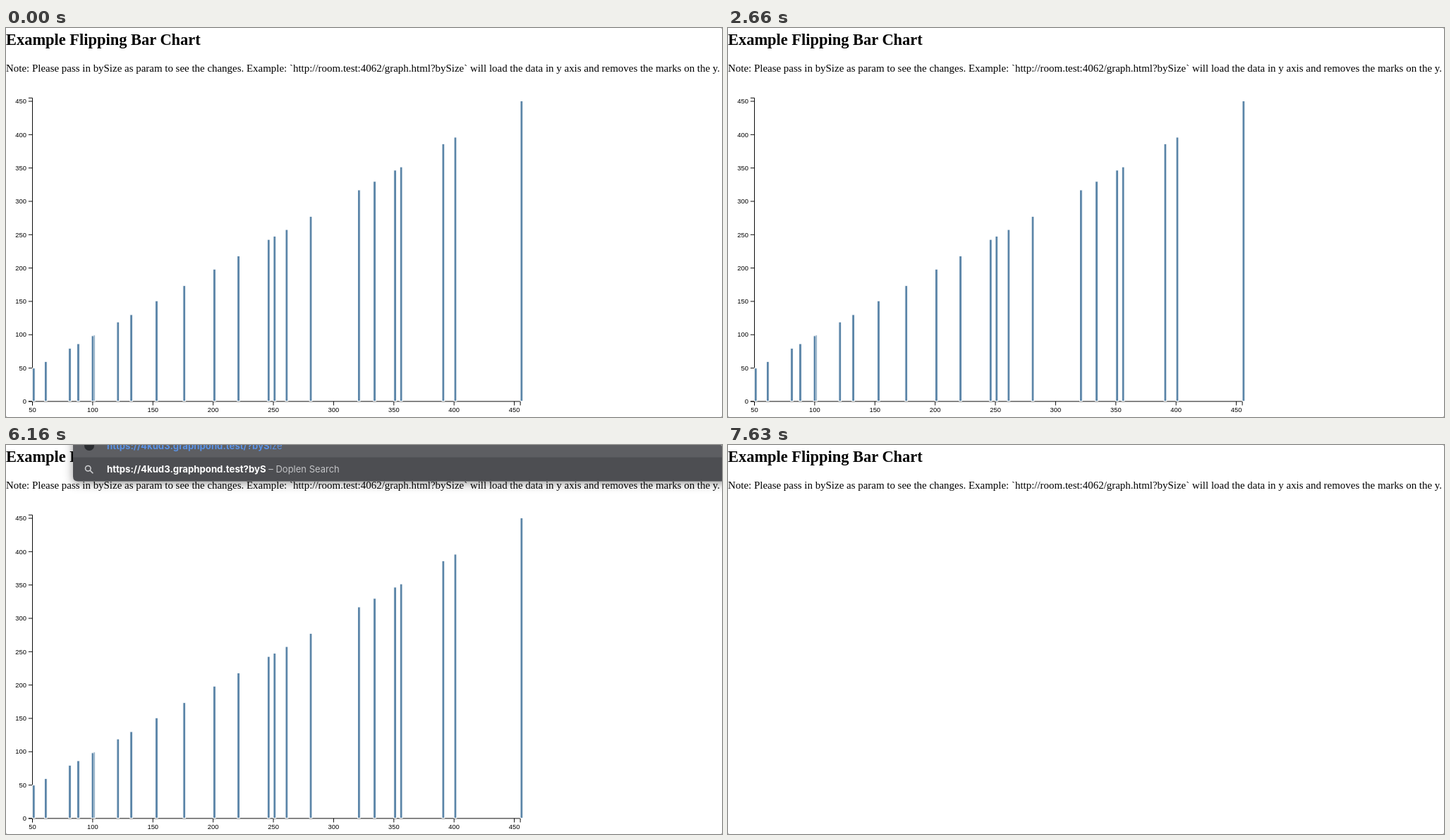
An HTML page for the animation above (8000 ms loop, 1015 px wide and 552 px high).

```html
<!DOCTYPE html>
<html lang="en">
<head>
<meta charset="utf-8">
<title>Flipping Bar Chart</title>
<style>
  html, body { margin: 0; width: 100%; height: 100%; overflow: hidden; background: #999; }
  svg { display: block; width: 1015px; height: 552px; background: #fff; border-radius: 0 2px 2px 2px; }
  .page { font: 14.95px "Liberation Serif", "Times New Roman", serif; }
  .page .title { font-size: 22.45px; font-weight: bold; }
  #chart { font: 9.4px "Liberation Sans", Arial, sans-serif; }
  #chart path { fill: none; stroke: #000; stroke-width: .95; }
  #chart rect { fill: #5b85a8; stroke: #fff; stroke-width: .93; }
  #menu { font: 13px Inter, "Open Sans", sans-serif; }
  #panel { filter: drop-shadow(0 3px 7px rgba(0, 0, 0, .4)); }
  #link { fill: #5b93e6; }
  #search { fill: #fff; }
  .typed { font-weight: 700; font-size: 13.2px; }
  .light .typed { font-weight: 500; font-size: 12.7px; }
  .hint { fill: #c3c4c7; }
</style>
</head>
<body>
<svg viewBox="0 0 1015 552">
  <g class="page">
    <text class="title" x="0" y="24.4">Example Flipping Bar Chart</text>
    <text x="0" y="62">Note: Please pass in bySize as param to see the changes. Example: `http://room.test:4062/graph.html?bySize` will load the data in y axis and removes the marks on the y.</text>
  </g>
  <g id="chart"></g>
  <g id="menu">
    <g id="panel">
      <path d="M95 -20H1040V51.5H102Q95 51.5 95 44.5Z" fill="#4d4e52"/>
      <path d="M95 -20H1040V17.5H95Z" fill="#5d5e62"/>
    </g>
    <circle cx="118" cy="1" r="7" fill="#2b2d31"/>
    <g fill="none" stroke="#d0d1d3" stroke-width="1.5">
      <circle cx="116.3" cy="33.2" r="3.8"/>
      <path d="M119.2 36.1L123.4 40.3"/>
    </g>
    <text id="link" x="143" y="5.5"></text>
    <text id="search" x="143" y="39"></text>
  </g>
</svg>
<script>
const LOOP = 8000;
const SITE = "https://4kud3.graphpond.test";
const QUERY = "bySize";
const KEY_TIMES = [5390, 5600, 6160, 6930, 7000, 7070];
const VALUES = [50, 60, 80, 87, 100, 99, 120, 131, 152, 175, 200, 220, 245,
  250, 260, 280, 320, 333, 350, 355, 390, 400, 455];
const LEFT = 37.5, BASE = 529.9, TICK = 5.6;
const $ = id => document.getElementById(id);
const xOf = v => LEFT + (v - 50) * 1.7077;
const yOf = v => BASE - v * .9464;

function drawChart() {
  let lines = `M${LEFT - TICK} ${yOf(455)}H${LEFT}V${BASE}h${-TICK}` +
    `M${LEFT} ${BASE + TICK}V${BASE}H${xOf(455)}v${TICK}`;
  let labels = "";
  for (let v = 0; v <= 450; v += 50) {
    lines += `M${LEFT} ${yOf(v)}h${-TICK}`;
    labels += `<text x="29" y="${yOf(v) + 3.2}" text-anchor="end">${v}</text>`;
    if (v) {
      lines += `M${xOf(v)} ${BASE}v${TICK}`;
      labels += `<text x="${xOf(v)}" y="545" text-anchor="middle">${v}</text>`;
    }
  }
  const bars = VALUES.map(v => {
    const h = v * .9363;
    return `<rect x="${xOf(v) - .1}" y="${BASE - .4 - h}" width="3.74" height="${h}"/>`;
  }).join("");
  $("chart").innerHTML = `<path d="${lines}"/>${labels}${bars}`;
}

let shown = -1;
function typeQuery(count) {
  if (count === shown) return;
  shown = count;
  const typed = QUERY.slice(0, count);
  $("link").innerHTML =
    `<tspan class="typed">${SITE}/?${typed}</tspan><tspan>${QUERY.slice(count)}</tspan>`;
  $("search").innerHTML =
    `<tspan class="typed">${SITE}?${typed}</tspan><tspan class="hint"> – Doplen Search</tspan>`;
  $("search").setAttribute("class", count < 3 ? "light" : "");
}

const show = (id, on) => { $(id).style.display = on ? "" : "none"; };
const within = (t, from, to) => t >= from && t < to;

function render(t) {
  show("chart", !within(t, 1960, 2660) && t < 7560);
  show("menu", within(t, 4970, 7280));
  typeQuery(KEY_TIMES.filter(k => t >= k).length);
}

drawChart();
render(0);
const start = performance.now();
requestAnimationFrame(function frame() {
  render((performance.now() - start) % LOOP);
  requestAnimationFrame(frame);
});
</script>
</body>
</html>
```
